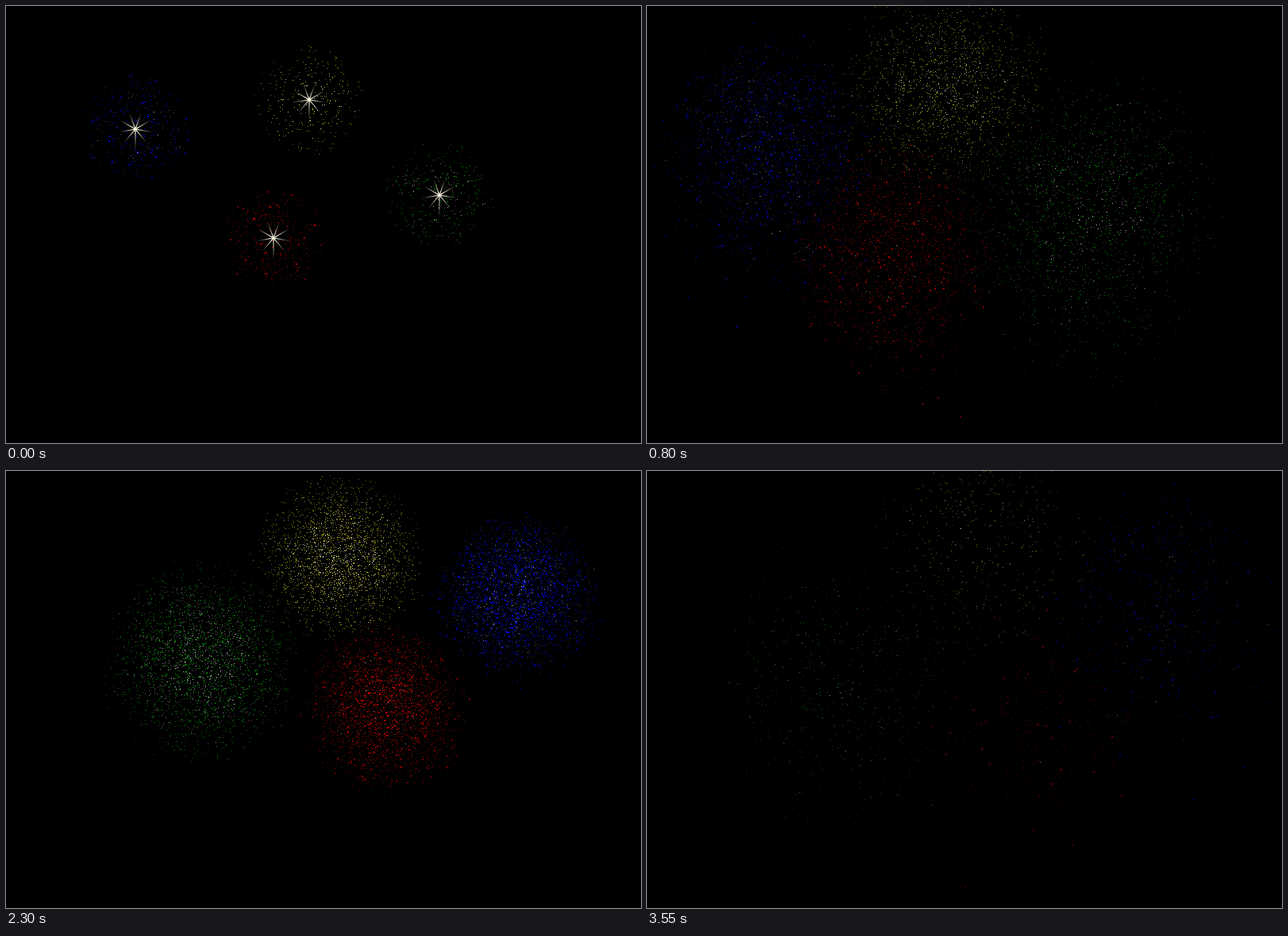
An HTML page with a canvas that plays this animation: 800 by 550 pixels, repeating every 4.2 s.

```html
<!DOCTYPE html>
<html lang="en">
<head>
<meta charset="utf-8">
<title>Fireworks</title>
<style>
  html, body { margin: 0; width: 100%; height: 100%; overflow: hidden; background: #000; }
  canvas { display: block; }
</style>
</head>
<body>
<canvas id="sky" width="800" height="550"></canvas>
<script>
const W = 800, H = 550, HALF = 2100;
const ctx = document.getElementById('sky').getContext('2d');

// Each burst opens at `from` and settles into a cloud around `to`; `sag` shifts its rim.
const bursts = [
  { from: [163, 155], to: [147, 142], sag: 20, r0: 70, r1: 153, count: 5400, sink: 135, lift: -32, last: .2,
    main: [0, 0, 255], haze: [62, 74, 120], core: [185, 195, 215], hazy: .3, hot: .1, big: .16 },
  { from: [337, 292], to: [310, 285], sag: 20, r0: 66, r1: 158, count: 4900, sink: 105, lift: 12, last: .09,
    main: [225, 0, 0], haze: [84, 46, 32], core: [190, 205, 180], hazy: .25, hot: .02, big: .08 },
  { from: [546, 238], to: [558, 233], sag: 10, r0: 70, r1: 188, count: 4300, sink: 100, lift: 10, last: .13,
    main: [0, 215, 0], haze: [125, 105, 125], core: [225, 235, 225], hazy: .28, hot: .25, big: 0 },
  { from: [382, 118], to: [376, 101], sag: 0, r0: 71, r1: 152, count: 4200, sink: 0, lift: -50, last: .12,
    main: [240, 240, 20], haze: [120, 115, 80], core: [255, 255, 235], hazy: .22, hot: .4, big: 0 }
];

// `focus` sets how strongly sparks gather in the middle.
const steps = [
  { at: 0, grow: 0, focus: .5, share: .075, glow: 1.1, star: 1 },
  { at: 100, grow: .27, focus: 1, share: .3, glow: 1, star: .5 },
  { at: 200, grow: .55, focus: 1.6, share: .62, glow: 1, star: 0 },
  { at: 400, grow: 1, focus: 2.4, share: 1, glow: 1, star: 0 },
  { at: 800, grow: 1, focus: 1.8, share: .42, glow: .85, star: 0, fall: true },
  { at: 1450, grow: 1, focus: 1.2, glow: .62, star: 0, fall: true, fading: true }
];

const mix = (a, b, k) => a + (b - a) * k;

function randomizer(seed) {
  return () => {
    seed = (seed + 0x6D2B79F5) | 0;
    let t = Math.imul(seed ^ (seed >>> 15), 1 | seed);
    t = (t + Math.imul(t ^ (t >>> 7), 61 | t)) ^ t;
    return ((t ^ (t >>> 14)) >>> 0) / 4294967296;
  };
}

bursts.forEach((burst, i) => {
  const rnd = randomizer(71 + i * 997);
  burst.sparks = Array.from({ length: burst.count }, () => ({
    angle: rnd() * 2 * Math.PI, reach: rnd(), tone: rnd(), light: rnd(),
    big: rnd() < burst.big, drop: rnd()
  }));
});

function drawSparks(b, step) {
  const cx = mix(b.from[0], b.to[0], step.grow);
  const cy = mix(b.from[1], b.to[1], step.grow);
  const radius = mix(b.r0, b.r1, step.grow);
  const total = Math.round(b.count * (step.fading ? b.last : step.share));
  for (const s of b.sparks.slice(0, total)) {
    const d = Math.sqrt(1 - s.reach ** (1 / (step.focus + 1)));
    const x = cx + Math.cos(s.angle) * d * radius;
    let y = cy + Math.sin(s.angle) * d * radius + b.sag * d * step.grow;
    if (step.fall && s.drop > .6) y += b.sink * (s.drop - .6) / .4;
    else if (step.fading) y += b.lift * (1 - d);
    const hot = b.hot * (1 - d);
    const rgb = s.tone < hot ? b.core : s.tone > 1 - b.hazy ? b.haze : b.main;
    const light = step.glow * (1 - .5 * d) * (.45 + .65 * s.light);
    const size = s.big && rgb === b.main ? 2 : 1;
    ctx.fillStyle = `rgb(${rgb.map(v => Math.min(255, Math.round(v * light))).join()})`;
    ctx.fillRect(Math.round(x), Math.round(y), size, size);
  }
}

function drawStar([x, y], alpha) {
  ctx.save();
  ctx.translate(x, y);
  ctx.globalAlpha = alpha;
  for (let i = 0; i < 9; i++) {
    const length = i ? 21 : 27;
    const fade = ctx.createLinearGradient(0, 0, length, 0);
    fade.addColorStop(0, '#f4f0dc');
    fade.addColorStop(.5, '#a5a294');
    fade.addColorStop(1, '#33332e');
    ctx.save();
    ctx.rotate((90 + i * 40) * Math.PI / 180);
    ctx.fillStyle = fade;
    ctx.beginPath();
    ctx.moveTo(0, -.75);
    ctx.lineTo(length, -.15);
    ctx.lineTo(length, .15);
    ctx.lineTo(0, .75);
    ctx.fill();
    ctx.restore();
  }
  ctx.fillStyle = '#fff8dc';
  ctx.beginPath();
  ctx.arc(0, 0, 1.7, 0, 2 * Math.PI);
  ctx.fill();
  ctx.restore();
}

function draw(step, mirrored) {
  ctx.setTransform(1, 0, 0, 1, 0, 0);
  ctx.fillStyle = '#000';
  ctx.fillRect(0, 0, W, H);
  ctx.fillStyle = '#040002';
  ctx.fillRect(0, 546, W, 4);
  if (mirrored) ctx.setTransform(-1, 0, 0, 1, W, 0);
  bursts.forEach(b => drawSparks(b, step));
  if (step.star) bursts.forEach(b => drawStar(b.from, step.star));
}

let shown = '';
function render(time) {
  const t = time % (2 * HALF);
  const mirrored = t >= HALF;
  const index = steps.findLastIndex(s => s.at <= t % HALF);
  const key = `${index}${mirrored}`;
  if (key === shown) return;
  shown = key;
  draw(steps[index], mirrored);
}

const start = performance.now();
function tick() {
  render(performance.now() - start);
  requestAnimationFrame(tick);
}
tick();
</script>
</body>
</html>
```
